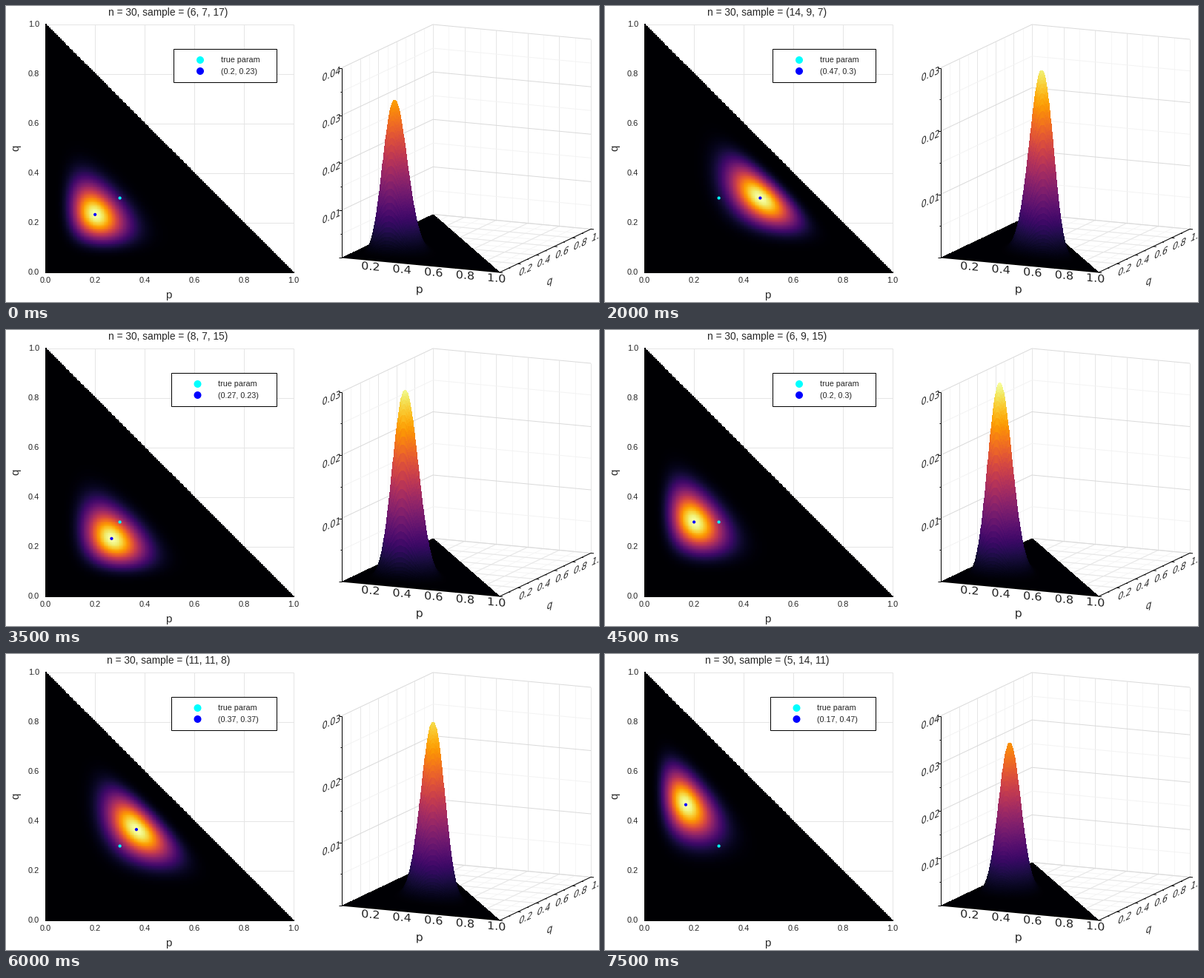
Animation, 800 px wide and 400 px high, one loop 8 s. Source, as a matplotlib script:

```python
import math

import matplotlib.pyplot as plt
import numpy as np
from matplotlib.animation import FuncAnimation
from matplotlib.collections import LineCollection
from matplotlib.patches import Circle, PathPatch, Rectangle
from matplotlib.textpath import TextPath
from matplotlib.transforms import Affine2D

W, H, DPI = 800, 400, 100
N = 30
TRUE = (0.3, 0.3)
SAMPLES = [(6, 7), (10, 4), (8, 6), (10, 9), (14, 9), (4, 13), (10, 12), (8, 7),
           (8, 9), (6, 9), (11, 6), (7, 11), (11, 11), (6, 10), (6, 9), (5, 14)]
SANS = "Liberation Sans"
INK = "#262626"

grid = np.linspace(0, 1, 201)
P, Q = np.meshgrid(grid, grid)
R = 1 - P - Q
INSIDE = R > -1e-9
R = np.clip(R, 0, 1)

fig = plt.figure(figsize=(W / DPI, H / DPI), dpi=DPI, facecolor="white")
ax = fig.add_axes([0, 0, 1, 1])
ax.axis("off")


def likelihood(a, b):
    c = N - a - b
    ways = math.comb(N, a) * math.comb(N - a, b)
    return ways * P**a * Q**b * R**c


def flat(p, q):
    """Stage position in the heatmap."""
    return 53.2 + 334.7 * p, 360 - 335 * q


def solid(p, q, h=0):
    """Stage position in the 3D box, h from 0 to 1."""
    return 453 + 213 * p + 123 * q, 340 + 20 * p - 58.5 * q - 256.5 * h


def lines(segments, color, width=1.0, z=1):
    art = LineCollection(segments, colors=color, linewidths=width * 0.72, zorder=z)
    return ax.add_collection(art)


def text(x, y, s, px, **kw):
    kw = {"ha": "center", "va": "center", "color": INK, **kw}
    return ax.text(x, y, s, family=SANS, fontsize=px * 0.72, **kw)


def dot(x, y, r, color, z=6):
    return ax.add_patch(Circle((x, y), r, fc=color, ec="none", zorder=z))


def slanted(x, y, s, px, along, up):
    """Text lying in a projected plane, centred on (x, y)."""
    path = TextPath((0, 0), s, size=px)
    box = path.get_extents()
    (ux, uy), (vx, vy) = along, up
    place = (Affine2D().translate(-(box.x0 + box.x1) / 2, -(box.y0 + box.y1) / 2)
             + Affine2D([[ux, vx, x], [uy, vy, y], [0, 0, 1]]))
    patch = PathPatch(path, fc=INK, lw=0, zorder=5, transform=place + ax.transData)
    return ax.add_patch(patch)


def draw_flat_axes():
    marks = np.arange(6) / 5
    lines([[flat(t, 0), flat(t, 1)] for t in marks]
          + [[flat(0, t), flat(1, t)] for t in marks], "#e5e5e5")
    lines([[flat(0, 1), flat(0, 0)], [flat(0, 0), flat(1, 0)]], "black", z=4)
    for t in marks:
        x, y = flat(t, t)
        text(x, 371, f"{t:.1f}", 11)
        text(45, y, f"{t:.1f}", 11, ha="right")
    text(219, 391, "p", 15)
    text(13, 192, "q", 15, rotation=90)


def draw_box():
    for step, color in ((0.1, "#f5f5f5"), (0.2, "#e6e6e6")):
        segs = []
        for t in np.arange(0, 1.01, step):
            segs += [[solid(0, t, 0), solid(0, t, 1)], [solid(t, 1, 0), solid(t, 1, 1)],
                     [solid(t, 0), solid(t, 1)], [solid(0, t), solid(1, t)]]
        lines(segs, color)
    lines([[solid(0, 0, 1), solid(0, 0)], [solid(0, 0), solid(1, 0)],
           [solid(1, 0), solid(1, 1)]], "black", z=4)
    ticks = []
    for i in range(11):
        x, y = solid(1, i / 10)
        size = 4 if i % 2 == 0 else 2
        ticks.append([(x, y), (x + size, y + size * 0.1)])
    lines(ticks, "black", z=4)
    for t in np.arange(1, 6) / 5:
        x, y = solid(t, 0)
        slanted(x - 4, y + 7.5, f"{t:.1f}", 14.5, (1.1, 0.1), (0, -1))
        x, y = solid(1, t)
        slanted(x + 10.5, y + 8, f"{t:.1f}", 14, (0.8, -0.37), (0.25, -1))
    slanted(558, 385, "p", 15, (1.05, 0.1), (0, -1))
    slanted(733, 374, "q", 15, (0.8, -0.37), (0.2, -1))


def draw_levels(top):
    """Height grid, ticks and labels for an axis ending at top / 100."""
    major, minor, ticks, art = [], [], [], []
    for i in range(2 * top + 1):
        h = i / (2 * top)
        wall = [solid(0, 0, h), solid(0, 1, h), solid(1, 1, h)]
        (minor if i % 2 else major).append(wall)
        x, y = wall[0]
        ticks.append([(x - (2 if i % 2 else 4), y), (x, y)])
        if i and i % 2 == 0:
            art.append(slanted(439, y + 8, f"0.{i // 2:02d}", 14, (0.8, -0.36), (0.1, -1)))
    art += [lines(minor, "#f3f3f3"), lines(major, "#dadada"), lines(ticks, "black", z=4)]
    return art


draw_flat_axes()
draw_box()
levels = {top: draw_levels(top) for top in (3, 4)}

heat = ax.imshow(np.zeros_like(P), cmap="inferno", origin="lower", aspect="auto",
                 interpolation="nearest", extent=(52.7, 388.4, 360.8, 24.7), zorder=3)
title = text(219, 8.5, "", 13.8)
dot(*flat(*TRUE), 2.1, "cyan")
guess = dot(0, 0, 2.1, "blue", 7)

frame = ax.add_patch(Rectangle((226, 58), 138, 45, fc="white", ec="black", lw=0.72, zorder=5))
keys = [dot(262, 73, 5, "cyan"), dot(262, 88, 5, "blue")]
names = [text(290, y, s, 10.8, ha="left", zorder=6)
         for y, s in ((73.5, "true param"), (89.5, ""))]

ax.set_xlim(0, W)
ax.set_ylim(H, 0)
surface = None


def draw_surface(like, top):
    global surface
    if surface is not None:
        surface.remove()
    # Rows run from the back to the front so nearer cells cover farther ones.
    like = like[::-1]
    x, y = solid(P[::-1], Q[::-1], like * 100 / top)
    cells = (like[1:, 1:] + like[1:, :-1] + like[:-1, 1:] + like[:-1, :-1]) / 4
    ok = INSIDE[::-1]
    hide = ~(ok[1:, 1:] | (ok[1:, :-1] & ok[:-1, :-1]))
    surface = ax.pcolormesh(x, y, np.ma.array(cells, mask=hide), cmap="inferno",
                            vmin=0, vmax=top / 100, antialiased=False, zorder=3)
    ax.set_xlim(0, W)
    ax.set_ylim(H, 0)


def update(i):
    a, b = SAMPLES[i]
    like = np.where(INSIDE, likelihood(a, b), 0)
    top = math.ceil(like.max() * 100)

    heat.set_data(np.where(INSIDE, like, np.nan))
    heat.set_clim(0, like.max())
    draw_surface(like, top)
    for key, art in levels.items():
        for item in art:
            item.set_visible(key == top)

    title.set_text(f"n = {N}, sample = ({a}, {b}, {N - a - b})")
    guess.center = flat(a / N, b / N)
    label = f"({round(a / N, 2)}, {round(b / N, 2)})"
    left = 222.5 if len(label) > 11 else 226
    frame.set_x(left)
    frame.set_width(364.5 - left)
    names[1].set_text(label)
    for key, name in zip(keys, names):
        key.center = (left + 36, key.center[1])
        name.set_x(left + 63.5)
    return []


anim = FuncAnimation(fig, update, frames=len(SAMPLES), interval=500,
                     init_func=lambda: [], repeat=True, repeat_delay=0, blit=False)
plt.show()
```
